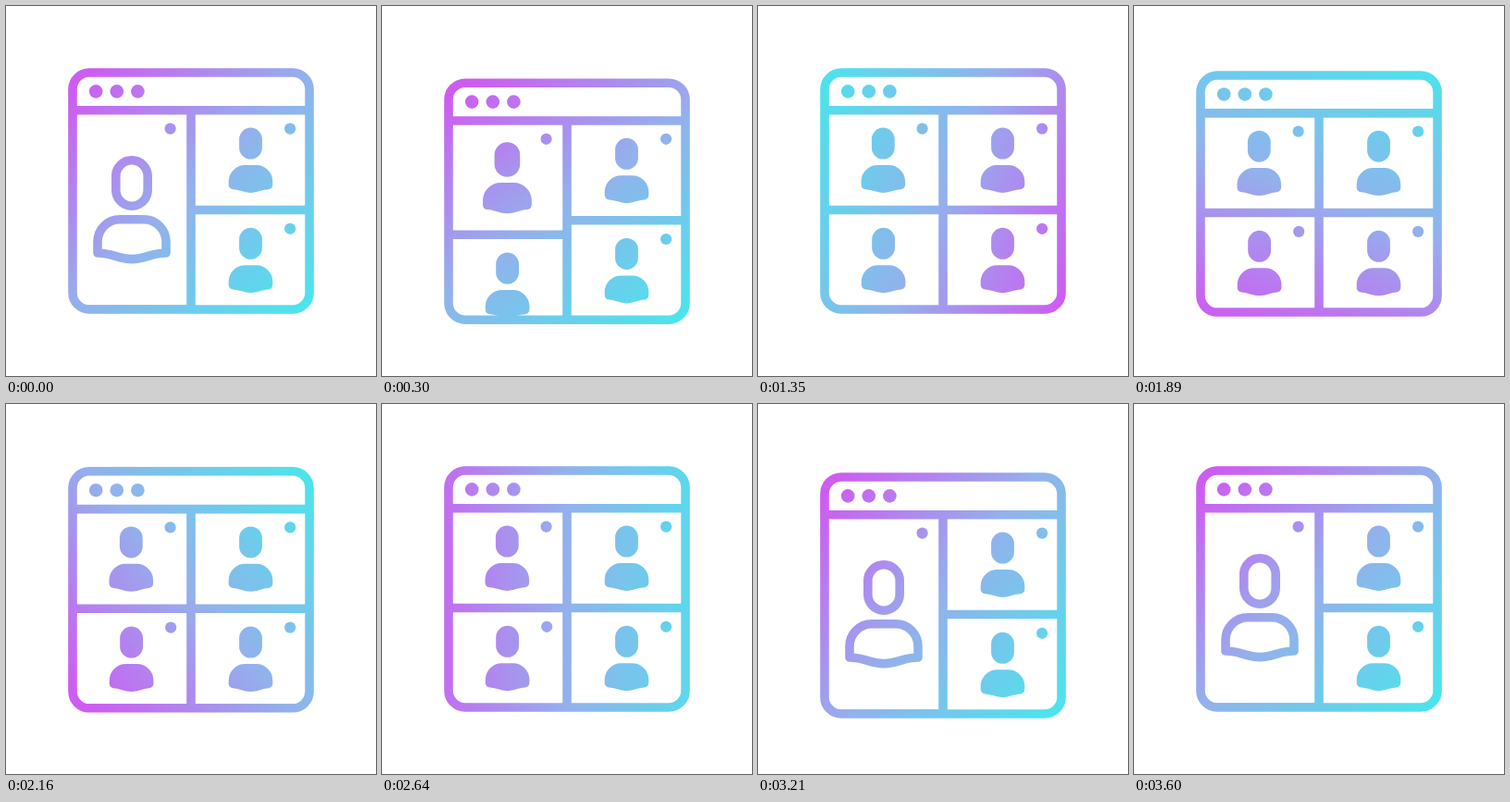
Animation, 400 px wide and 400 px high, one loop 5630 ms. Source, as an HTML page:

```html
<!DOCTYPE html>
<html lang="en">
<head>
<meta charset="utf-8">
<title>Video call window</title>
<style>
  html, body { margin: 0; width: 100%; height: 100%; overflow: hidden; background: #fff; }
  svg { display: block; width: 100vw; height: 100vh; }
  .line { fill: none; stroke: url(#tint); stroke-width: 9.6; }
  .person { fill: url(#tint); stroke: url(#tint); stroke-width: 9.6; stroke-linejoin: round; }
  circle { fill: url(#tint); }
</style>
</head>
<body>
<svg viewBox="0 0 400 400">
  <defs>
    <linearGradient id="tint" gradientUnits="userSpaceOnUse">
      <stop offset="0" stop-color="#cd5df1"/>
      <stop offset=".5" stop-color="#93b1ec"/>
      <stop offset="1" stop-color="#4ee2ec"/>
    </linearGradient>
    <clipPath id="inside"><rect x="72" y="72" width="256" height="256" rx="18"/></clipPath>
  </defs>
  <g id="win">
    <g clip-path="url(#inside)">
      <path id="speaker" class="person"/>
      <path id="guest" class="person"/>
      <path id="upper" class="person"/>
      <path id="lower" class="person"/>
      <path id="divider" class="line"/>
      <circle id="guestDot" cx="178.2"/>
    </g>
    <rect class="line" x="72" y="72" width="256" height="256" rx="18"/>
    <path class="line" d="M72 112.8H328M200 112.8V328M200 220.5H328"/>
    <circle cx="97.2" cy="92.4" r="7.3"/>
    <circle cx="119.8" cy="92.4" r="7.3"/>
    <circle cx="142.4" cy="92.4" r="7.3"/>
    <circle cx="177.6" cy="132.6" r="6.1"/>
    <circle cx="307.1" cy="132.6" r="6.1"/>
    <circle cx="307.1" cy="240.8" r="6.1"/>
  </g>
</svg>
<script>
const LOOP = 5630;
const ROW = 108.2;
const el = id => document.getElementById(id);
const tint = el('tint');

const clamp = x => Math.min(1, Math.max(0, x));
const mix = (a, b, k) => a + (b - a) * k;
const span = (t, start, length) => clamp((t - start) / length);
const sine = u => 0.5 - 0.5 * Math.cos(Math.PI * u);
const cubic = u => u < 0.5 ? 4 * u ** 3 : 1 - 4 * (1 - u) ** 3;

const small = { cx: 135.3, headY: 148.6, headW: 7.6, headH: 12.2,
                top: 176.8, w: 19, r: 13, side: 193.4, base: 197.2 };
const large = { cx: 136, headY: 191.5, headW: 17.2, headH: 24.7,
                top: 230.8, w: 37, r: 24, side: 267, base: 273.6 };

function blend(a, b, k) {
  const out = {};
  for (const key in a) out[key] = mix(a[key], b[key], k);
  return out;
}

// Head and shoulders as one path along the middle of the outline.
function figure(s, dx = 0, dy = 0) {
  const x = s.cx + dx, w = s.w, r = s.r, hw = s.headW;
  const y1 = s.headY - s.headH + hw + dy, y2 = s.headY + s.headH - hw + dy;
  const top = s.top + dy, side = s.side + dy, base = s.base + dy;
  return `M${x - hw} ${y1}A${hw} ${hw} 0 0 1 ${x + hw} ${y1}V${y2}` +
    `A${hw} ${hw} 0 0 1 ${x - hw} ${y2}Z` +
    `M${x - w} ${side}V${top + r}A${r} ${r} 0 0 1 ${x - w + r} ${top}` +
    `H${x + w - r}A${r} ${r} 0 0 1 ${x + w} ${top + r}V${side}` +
    `C${x + w * 0.55} ${side} ${x + w * 0.42} ${base} ${x} ${base}` +
    `C${x - w * 0.42} ${base} ${x - w * 0.55} ${side} ${x - w} ${side}Z`;
}

function bounce(t, start, rise, fall, height) {
  const peak = start + rise;
  return height * (t < peak ? sine(span(t, start, rise)) : 1 - cubic(span(t, peak, fall)));
}

// Gradient direction: time in ms, degrees, degrees per ms.
const turns = [
  [0, 45, 0], [300, 54, 0.065], [690, 90, 0.148], [1890, 290, 0.138],
  [2640, 360, 0.092], [2940, 387, 0.047], [3600, 405, 0]
];

function direction(t) {
  if (t >= 3600) return 405;
  const i = turns.findIndex(p => p[0] > t);
  const [t0, a0, v0] = turns[i - 1], [t1, a1, v1] = turns[i];
  const d = t1 - t0, u = (t - t0) / d, e = u * u * (3 - 2 * u);
  return mix(a0, a1, e) + d * u * (1 - u) * (v0 * (1 - u) - v1 * u);
}

function set(node, attrs) {
  for (const key in attrs) node.setAttribute(key, attrs[key]);
}

function draw(t) {
  const split = cubic(span(t, 0, 450)) - cubic(span(t, 2670, 460));
  const drop = bounce(t, 0, 270, 530, 11.2) + bounce(t, 1710, 210, 400, 3.2) +
               bounce(t, 2700, 270, 530, 11.2);
  const line = mix(328, 220.5, split);

  const a = direction(t) * Math.PI / 180;
  const gx = 165 * Math.cos(a), gy = 165 * Math.sin(a);
  set(tint, { x1: 200 - gx, y1: 200 - gy, x2: 200 + gx, y2: 200 + gy });

  set(el('win'), { transform: `translate(0 ${drop})` });
  set(el('speaker'), {
    d: figure(blend(large, small, split)),
    'fill-opacity': span(split, 0.4, 0.35)
  });
  set(el('guest'), { d: figure(small, 0.3, line - 220.5 + ROW) });
  set(el('divider'), { d: `M72 ${line}H200` });
  set(el('guestDot'), { cy: line + 20.3, r: 6.1 * sine(span(t, 1710, 150)) });
}

el('upper').setAttribute('d', figure(small, 129.2));
el('lower').setAttribute('d', figure(small, 129.2, ROW));

const begin = performance.now();
function tick() {
  draw((performance.now() - begin) % LOOP);
  requestAnimationFrame(tick);
}
draw(0);
requestAnimationFrame(tick);
</script>
</body>
</html>
```
